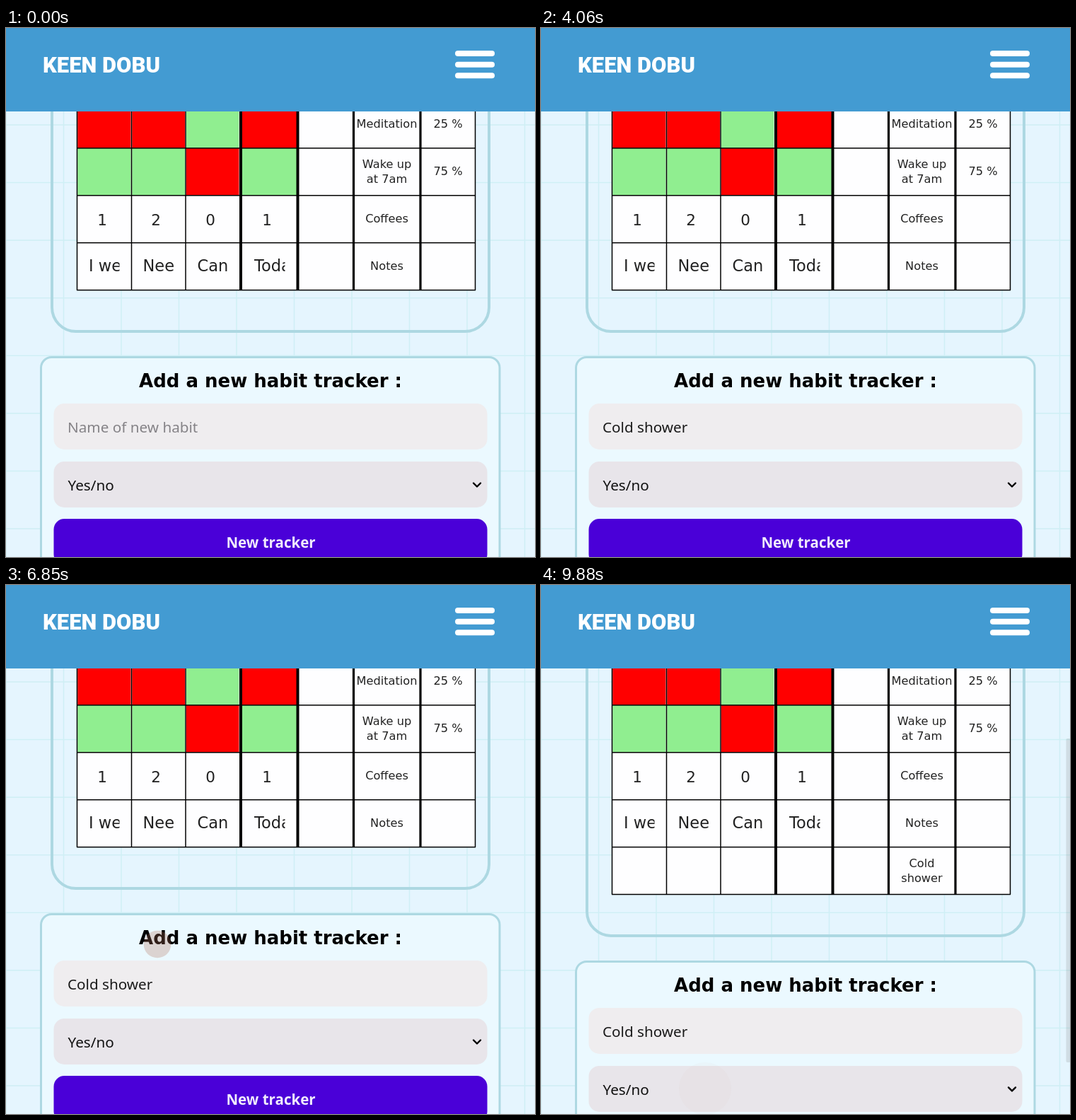
An HTML page with a canvas for the animation above (9910 ms loop, 748x748 px).

```html
<!DOCTYPE html>
<html lang="en">
<head>
<meta charset="utf-8">
<title>Habit tracker</title>
<style>
html, body { margin: 0; width: 100%; height: 100%; overflow: hidden; }
canvas { display: block; width: 748px; height: 748px; }
</style>
</head>
<body>
<canvas width="748" height="748"></canvas>
<script>
const ctx = document.querySelector('canvas').getContext('2d');
const LOOP = 9910, HABIT = 'Cold shower';
const TYPE_START = 1620, TYPE_STEP = 95;
const MENU_OPEN = 4430, MENU_CLOSE = 6750, SENT = 8510, ADDED = 9450;
const TOUCHES = [[500, 204, 574], [4420, 216, 651], [6740, 214, 508], [8525, 232, 712]];
const COLS = [100.5, 177.5, 254, 332, 412.5, 491.5, 586, 663.5];
const LINES = [1.5, 1.5, 1.5, 4, 4, 3.2, 3.2, 1.5];
const ROW = 66.9, TOP = 103;
const TABLE_FONT = '"DejaVu Sans", sans-serif';
const FORM_FONT = '"Noto Sans", sans-serif';

const clamp = v => Math.max(0, Math.min(1, v));
const ramp = (t, a, b) => clamp((t - a) / (b - a));
const easeOut = p => 1 - (1 - p) ** 2;

function rect(x, y, w, h, fill) {
  ctx.fillStyle = fill;
  ctx.fillRect(x, y, w, h);
}

function box(x, y, w, h, r, fill, stroke, lineWidth) {
  ctx.beginPath();
  ctx.roundRect(x, y, w, h, r);
  if (fill) { ctx.fillStyle = fill; ctx.fill(); }
  if (stroke) { ctx.strokeStyle = stroke; ctx.lineWidth = lineWidth; ctx.stroke(); }
}

function text(s, x, y, font, color = '#000', align = 'left') {
  ctx.font = font;
  ctx.fillStyle = color;
  ctx.textAlign = align;
  ctx.fillText(s, x, y);
}

function polyline(points, width) {
  ctx.beginPath();
  points.forEach(([x, y]) => ctx.lineTo(x, y));
  ctx.strokeStyle = '#000';
  ctx.lineWidth = width;
  ctx.lineCap = ctx.lineJoin = 'round';
  ctx.stroke();
}

function background() {
  rect(0, 0, 748, 748, '#e5f5fe');
  for (let i = 0; i < 10; i++) {
    rect(i * 81.5 - 0.75, 0, 1.5, 748, '#cfeff5');
    rect(0, 54.7 + i * 81.57, 748, 1.5, '#cfeff5');
  }
}

function table(added) {
  const rows = added ? 5 : 4, height = ROW * rows;
  box(65, 0, 618, 429 + (added ? ROW : 0), 34, null, '#add8e2', 4);
  rect(100, TOP, 564, height, '#fefeff');
  ['rrgr', 'ggrg'].forEach((row, r) => [...row].forEach((c, i) => {
    const x = COLS[i] + LINES[i] / 2;
    rect(x, TOP + r * ROW, COLS[i + 1] - x - (i === 2 ? 2.5 : 1), ROW, c === 'r' ? '#ff0000' : '#90ee90');
  }));
  for (let r = 1; r <= rows; r++) rect(100, TOP + r * ROW - 0.75, 564, 1.5, '#000');
  COLS.forEach((x, i) => rect(x - LINES[i] / 2, TOP, LINES[i], height, '#000'));

  const label = (s, x, y) => text(s, x, y, '16.2px ' + TABLE_FONT, '#222', 'center');
  [['Meditation', 141], ['Wake up', 198], ['at 7am', 219], ['Coffees', 275], ['Notes', 342]]
    .forEach(([s, y]) => label(s, 538.5, y));
  label('25 %', 625, 141);
  label('75 %', 625, 208);
  if (added) {
    label('Cold', 538.5, 399);
    label('shower', 538.5, 420);
  }
  [...'1201'].forEach((s, i) =>
    text(s, [136, 212, 289, 369][i], 278.5, '21.5px ' + TABLE_FONT, '#222', 'center'));
  ['I we', 'Nee', 'Can', 'Toda'].forEach((s, i) => {
    const x = [117, 193.5, 270.5, 351][i];
    ctx.save();
    ctx.beginPath();
    ctx.rect(x, 315, 43.5, 40);
    ctx.clip();
    text(s, x, 344, '22.5px ' + TABLE_FONT, '#222');
    ctx.restore();
  });
}

function nameField(t) {
  const typed = HABIT.slice(0, Math.floor(clamp((t - TYPE_START) / (TYPE_STEP * HABIT.length)) * HABIT.length));
  box(67.5, 531, 613, 65, 15, '#efedef');
  const font = '20.7px ' + FORM_FONT;
  text(typed || 'Name of new habit', 87, 572, font, typed ? '#1a1a1a' : '#858387');
  const typing = t > TYPE_START && t < TYPE_START + TYPE_STEP * HABIT.length;
  const blinkOn = (t + 440) % 1000 < 500 || (t > 560 && t < 1100);
  if (t > 560 && t < MENU_OPEN && (typing || blinkOn)) {
    rect(87 + (typed ? ctx.measureText(typed).width + 1 : 0), 551, 1.6, 27, '#000');
  }
}

function form(t) {
  const sent = t >= SENT;
  ctx.save();
  if (t >= ADDED) ctx.translate(0, ROW);
  box(49.5, 465.5, 648.5, sent ? 283 : 320, 15, '#ebf9ff', '#add8e2', 3);
  text('Add a new habit tracker :', 374, 508, 'bold 26px ' + TABLE_FONT, '#000', 'center');
  nameField(t);
  box(67.5, 613, 613, 65, 15, '#e8e5ea');
  text('Yes/no', 87.5, 654, '20.7px ' + FORM_FONT, '#111');
  polyline([[661, 643.5], [666, 648.5], [671, 643.5]], 2.4);
  if (!sent) {
    box(67.5, 694, 613, 65, 15, '#4a00d8');
    text('New tracker', 374.5, 735, 'bold 20.5px ' + FORM_FONT, '#f1ebfc', 'center');
  } else if (t < ADDED) {
    ctx.lineCap = 'butt';
    polyline([[352, 714], [366, 728], [395.5, 699]], 9.5);
  }
  ctx.restore();
}

function menu() {
  ctx.save();
  ctx.shadowColor = 'rgba(0,0,0,.3)';
  ctx.shadowBlur = 5;
  box(68.5, 482, 609.5, 127.5, 8, '#f9f9fb', '#bfbfc3', 1.5);
  ctx.restore();
  box(74, 487, 598, 39, 4, '#dcdadc');
  ['Yes/no', 'Number', 'Text'].forEach((s, i) =>
    text(s, 83.5, 515 + i * 39.2, '20.5px ' + FORM_FONT, '#505052'));
}

function header() {
  rect(0, 0, 748, 118, '#439bd2');
  text('KEEN DOBU', 52, 62.5, '900 31px Roboto, sans-serif', '#fff');
  for (const y of [32, 47.7, 63.3]) box(635, y, 56, 8, 4, '#fff');
}

function disc(x, y, r, alpha) {
  ctx.beginPath();
  ctx.arc(x, y, r, 0, 7);
  ctx.fillStyle = `rgba(176,112,92,${alpha})`;
  ctx.fill();
}

function touch(age, x, y) {
  if (age < 0 || age > 1450) return;
  const fade = 1 - ramp(age, 560, 1000);
  const halo = easeOut(ramp(age, 180, 560));
  if (halo) {
    disc(x, y, 33 + 25 * halo, 0.09 * fade * (2 - halo));
    disc(x, y, 33 + 15 * halo, 0.07 * fade);
  }
  const tail = 0.03 * (1 - ramp(age, 1350, 1450));
  disc(x, y, 33 * ramp(age, 0, 190) + 4 * ramp(age, 700, 1200), Math.max(0.28 * fade, tail));
}

function scrollbar(t) {
  let alpha = 0;
  for (const [start] of TOUCHES) {
    const age = t - start;
    alpha = Math.max(alpha, ramp(age, 140, 220) * (1 - ramp(age, 1050, 1420)));
  }
  ctx.globalAlpha = alpha;
  box(742.5, 217, 6, t >= ADDED ? 458 : 483, 2, '#69696c');
  ctx.globalAlpha = 1;
}

function draw(now) {
  const t = now % LOOP;
  background();
  table(t >= ADDED);
  form(t);
  if (t >= MENU_OPEN && t < MENU_CLOSE) menu();
  header();
  scrollbar(t);
  for (const [start, x, y] of TOUCHES) touch(t - start, x, y);
  requestAnimationFrame(draw);
}

const origin = performance.now();
requestAnimationFrame(function first(now) {
  const frame = time => draw(Math.max(0, time - origin));
  const tick = requestAnimationFrame;
  window.requestAnimationFrame = () => tick(frame);
  frame(now);
});
</script>
</body>
</html>
```
